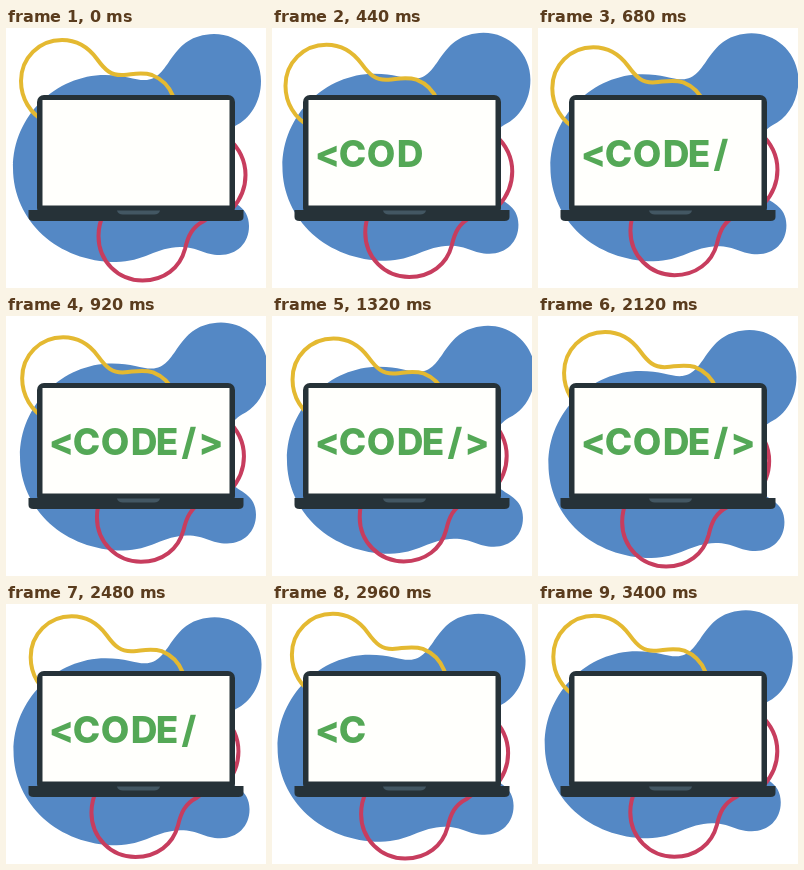
An HTML page that plays this animation: 260 px wide and 260 px high, repeating every 3440 ms.

```html
<!DOCTYPE html>
<html lang="en">
<head>
<meta charset="utf-8">
<style>
html, body { margin: 0; height: 100%; overflow: hidden; background: #fff; }
svg { display: block; width: 100vw; height: 100vh; }
.line { fill: none; stroke-width: 4; stroke-linecap: round; }
text { font: 800 37px Inter, Lato, sans-serif; fill: #54a856; text-anchor: middle; }
</style>
</head>
<body>
<svg viewBox="0 0 260 260">
  <path id="blob" fill="#5488c5" d="M7 140C7 88 50 47 99 47C120 47 130 53 141 52C166 49 163 7 208 6C234 6 255 27 255 53C255 74 244 91 229 98C208 110 200 150 218 167C226 175 243 178 243 198C243 215 231 227 214 227C198 227 192 219 174 219C151 219 137 234 110 234C52 234 7 193 7 140Z"/>
  <path id="gold" class="line" stroke="#e4b931" d="M40 94C24 86 15 70 15 53C15 30 33 12 56 12C72 12 83 20 91 31C99 42 105 48 118 47C129 46 136 44 146 47C156 51 163 58 167 68C169 73 171 78 171 84"/>
  <g id="red" class="line" stroke="#c73d5e">
    <path d="M222 110C233 120 239.5 132 239.5 147C239.5 160 235 171 226 181"/>
    <path d="M98 185C94.5 192 92.5 199 92.5 208C92.5 233 112 252.5 136.5 252.5C158 252.5 174 240 179 221C182 208 186 199 198 193L206 187"/>
  </g>
  <rect x="31" y="67" width="198" height="120" rx="7" fill="#263238"/>
  <rect x="36.5" y="72" width="187" height="105.5" fill="#fffffc"/>
  <path fill="#263238" d="M22.5 182H237.5V189Q237.5 193 232.5 193H27.5Q22.5 193 22.5 189Z"/>
  <path fill="#435763" d="M111 182.5H154Q153 186.5 148 186.5H117Q112 186.5 111 182.5Z"/>
  <text id="code" y="139" x="55.5 80.5 109 138 161 183 205"></text>
</svg>
<script>
const LOOP = 3440, FRAME = 40, STEP = 120, WORD = '<CODE/>';
const $ = id => document.getElementById(id);
const clamp = n => Math.max(0, Math.min(WORD.length, n));

// Shift a shape around a circle, beginning at the angle start.
function orbit(id, radius, start, turn) {
  const a = start * Math.PI / 180, b = a + turn;
  const x = radius * (Math.cos(b) - Math.cos(a));
  const y = radius * (Math.sin(b) - Math.sin(a));
  $(id).setAttribute('transform', `translate(${x} ${y})`);
}

function draw(now) {
  const t = Math.floor(now % LOOP / FRAME) * FRAME;
  const turn = t / LOOP * 2 * Math.PI;
  orbit('blob', 4.7, 226, turn);
  orbit('gold', 6.3, 221, -turn);
  orbit('red', 4.6, 35, -turn);
  const typed = clamp(Math.floor((t + 80) / STEP));
  const erased = clamp(Math.floor((t - 2300) / STEP));
  $('code').textContent = WORD.slice(0, typed - erased);
}

const begin = performance.now();
function tick() {
  draw(performance.now() - begin);
  requestAnimationFrame(tick);
}
tick();
</script>
</body>
</html>
```
